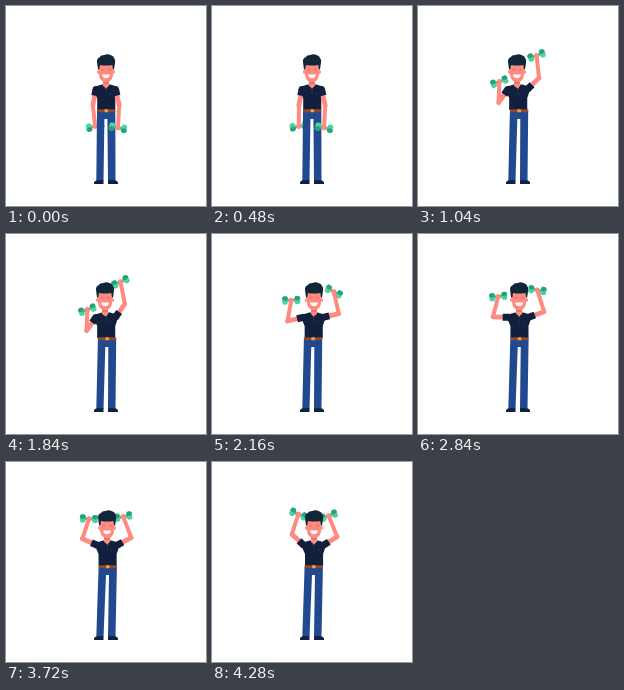
An HTML page that plays this animation: 200x200 px, repeating every 4320 ms.

```html
<!DOCTYPE html>
<html lang="en">
<head>
<meta charset="utf-8">
<title>Dumbbell workout</title>
<style>
  html, body { margin: 0; width: 100%; height: 100%; overflow: hidden; background: #fff; }
  svg { display: block; width: 100%; height: 100%; }
  .skin { fill: #ff8a80; }
  .navy { fill: #12203e; }
  .hair { fill: #12263a; }
  .limb { fill: none; stroke: #ff8a80; stroke-linecap: round; stroke-linejoin: round; }
  .sleeve { fill: none; stroke: #12203e; stroke-width: 7; }
</style>
</head>
<body>
<svg viewBox="0 0 200 200">
  <defs>
    <g id="plate">
      <path fill="#4fd3a0" d="M3.4 -2.8 4.8 -4.1H7.6L9 -2.6V2.6L7.6 4.1H4.8L3.4 2.8Z"/>
      <path fill="#27a27c" d="M3.4 .4 6.4 -.6 9 1V2.6L7.6 4.1H4.8L3.4 2.8Z"/>
    </g>
    <g id="bell">
      <path fill="#35b88b" d="M-5 -1.4H5V1.4H-5Z"/>
      <use href="#plate"/>
      <use href="#plate" transform="scale(-1 1)"/>
    </g>
  </defs>

  <g id="left"></g>
  <path id="legs" fill="#20498f"/>
  <path class="navy" d="M88 178V176.5Q88 175 91 174.2H97.5V178ZM112 178V176.5Q112 175 109 174.2H102V178Z"/>
  <g id="torso">
    <path class="navy" d="M95.8 78.5H104.2L110 80.3Q112 82 111 87L109.3 92V104H91.2V92L89 87Q88 82 90 80.3Z"/>
    <path class="skin" d="M97 78H103L100 83Z"/>
    <path fill="none" stroke="#2b3d60" stroke-width=".6" d="M100 83V89M103 88H106"/>
  </g>
  <g id="belt">
    <path fill="#92472e" d="M91 103.3H109.3V106.2H91Z"/>
    <path fill="#e9a24c" d="M98.5 103.3H102V106.2H98.5Z"/>
  </g>
  <g id="right"></g>
  <g id="head">
    <path class="skin" d="M97 72H103V80L100 82 97 80Z"/>
    <path fill="#e8706a" d="M97 75Q100 77.5 103 75V77.3Q100 78.8 97 77.3Z"/>
    <circle class="skin" cx="92.6" cy="66" r="1.7"/>
    <circle class="skin" cx="107.4" cy="66" r="1.7"/>
    <path class="skin" d="M92.8 57H107.2V67Q107 76 100 76T92.8 67Z"/>
    <path class="hair" d="M92 63.5 91 56Q90.6 52.4 93.5 51.2 95 48.8 98.5 48.9 101.5 47.6 104.5 49 107.6 49.6 108.4 52.6 109.6 54 109 57L108 63.5H107L106.3 59Q100 60 94 59L93.2 63.5Z"/>
    <path fill="none" stroke="#ad4c52" stroke-width=".6" d="M95.4 64Q96.6 62.9 97.8 64M102.2 64Q103.4 62.9 104.6 64"/>
    <path fill="#fff" d="M96 68.5H104Q103.2 72.3 100 72.3T96 68.5Z"/>
  </g>
</svg>
<script>
  const LOOP = 4320, STEP = 40, UPPER = 16.3;

  const $ = id => document.getElementById(id);
  const set = (el, attrs) => { for (const k in attrs) el.setAttribute(k, attrs[k]); };

  function add(parent, tag, attrs) {
    const el = document.createElementNS("http://www.w3.org/2000/svg", tag);
    set(el, attrs);
    return parent.appendChild(el);
  }

  function makeArm(group, shoulder, forearm) {
    return {
      shoulder, forearm,
      upper: add(group, "path", { class: "limb", "stroke-width": 4.8 }),
      sleeve: add(group, "path", { class: "sleeve" }),
      cap: add(group, "circle", { class: "navy", r: 3.3 }),
      bell: add(group, "use", { href: "#bell" }),
      fore: add(group, "path", { class: "limb", "stroke-width": 4 }),
      hand: add(group, "circle", { class: "skin", r: 2.6 })
    };
  }

  // Eased progress from 0 to 1 between two times
  function ramp(t, from, to) {
    const u = Math.min(1, Math.max(0, (t - from) / (to - from)));
    return u * u * (3 - 2 * u);
  }

  function along([x, y], degrees, length) {
    const a = degrees * Math.PI / 180;
    return [x + length * Math.cos(a), y + length * Math.sin(a)];
  }

  // Angles in degrees, clockwise from the right; the wrist is relative to the forearm
  function drawArm(arm, shift, upper, fore, wrist) {
    const shoulder = [arm.shoulder + shift, 83.3];
    const elbow = along(shoulder, upper, UPPER);
    const hand = along(elbow, fore, arm.forearm);
    set(arm.upper, { d: `M${shoulder}L${elbow}` });
    set(arm.sleeve, { d: `M${shoulder}L${along(shoulder, upper, 6.5)}` });
    set(arm.cap, { cx: shoulder[0], cy: shoulder[1] });
    set(arm.fore, { d: `M${elbow}L${hand}` });
    set(arm.hand, { cx: hand[0], cy: hand[1] });
    set(arm.bell, { transform: `translate(${hand}) rotate(${fore + wrist})` });
  }

  const left = makeArm($("left"), 90, 21);
  const right = makeArm($("right"), 109.5, 22.5);

  function draw(t) {
    const lift = ramp(t, 410, 1050);
    const swing = ramp(t, 470, 1060);
    const hold = ramp(t, 1040, 1240);
    const drop = ramp(t, 1840, 2160);
    const settle = ramp(t, 2160, 3360);
    const press = ramp(t, 3360, 4200);

    const head = -lift + 3 * drop - 1.5 * settle + 1.5 * press;
    const hip = .9 * lift + .7 * settle;
    const chest = (head + hip) / 2;
    for (const [id, x] of [["head", head], ["torso", chest], ["belt", hip]])
      set($(id), { transform: `translate(${x} 0)` });
    set($("legs"), {
      d: `M${91 + hip} 105H${109.3 + hip}L109.5 175H102L${101.4 + hip} 113H${98.4 + hip}L97.5 175H90.3Z`
    });

    drawArm(left, chest,
      101 + 24 * lift ** 2 + 42 * drop + 24 * settle + 32 * press,
      84 + 188 * lift + 8 * drop + 8 * settle,
      -98 - 14 * lift + 10 * drop - 16 * settle + 32 * press);
    drawArm(right, chest,
      77 - 122 * swing - 10 * hold + 42 * drop - 12 * settle - 7 * press,
      93 - 190 * swing - 4 * hold - 2 * drop - 7 * settle - 2 * press,
      -82 - 22 * swing + 54 * drop - 24 * settle - 14 * press);
  }

  const start = performance.now();
  function tick() {
    const t = (performance.now() - start) % LOOP;
    draw(Math.floor(t / STEP) * STEP);
    requestAnimationFrame(tick);
  }
  tick();
</script>
</body>
</html>
```
